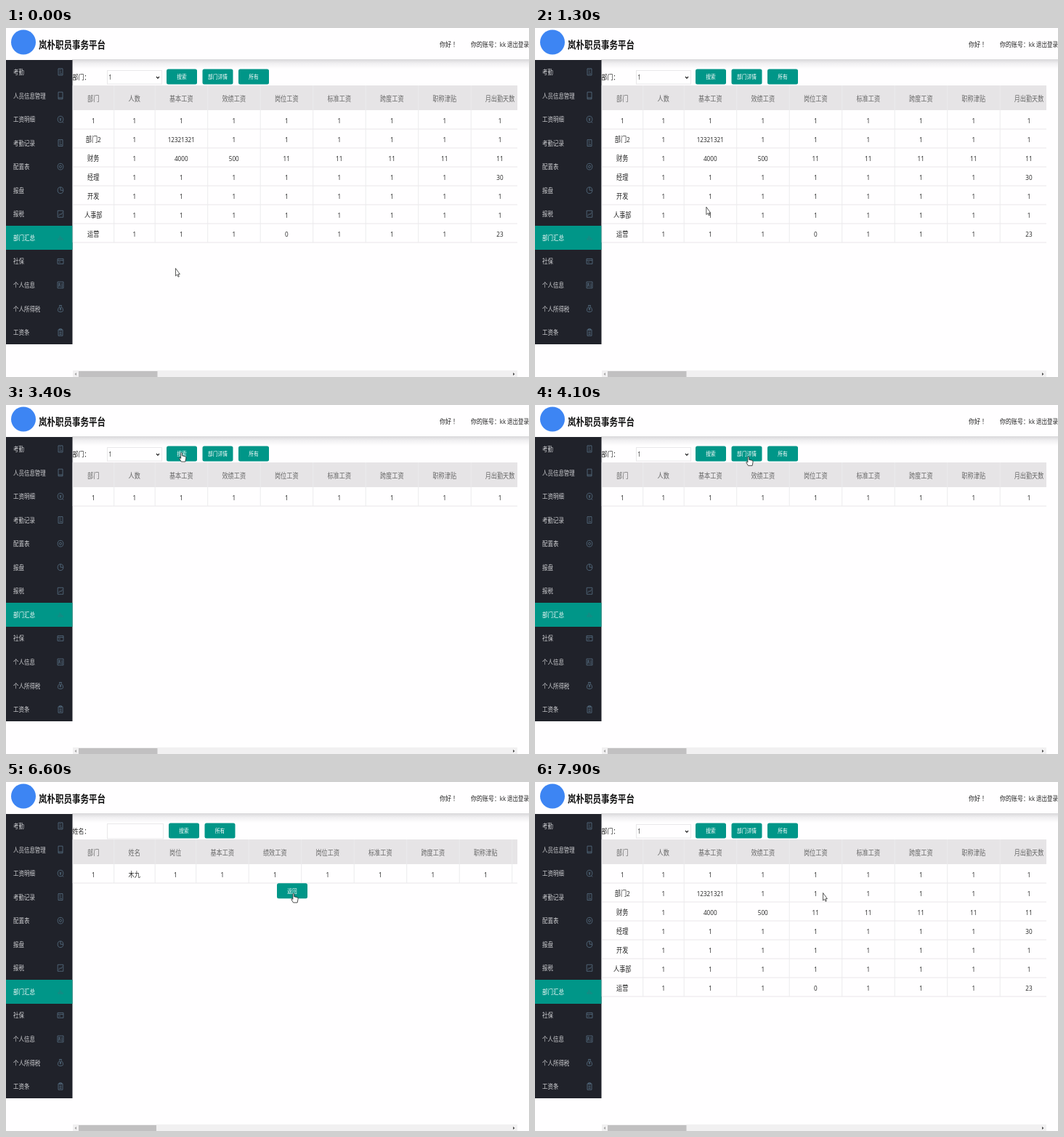
These frames come from a looping animation (720 px wide and 480 px high, 8000 ms). An HTML page:

```html
<!DOCTYPE html>
<html lang="zh">
<head>
<meta charset="utf-8">
<style>
html, body { margin: 0; width: 100%; height: 100%; overflow: hidden; background: #fffeff; }
svg { display: block; width: 720px; height: 480px; }
text { font-family: "Open Sans", "Noto Sans CJK SC", "Noto Sans CJK", sans-serif; }
</style>
</head>
<body>
<svg id="stage" viewBox="0 0 720 480">
  <defs>
    <linearGradient id="shade" x2="0" y2="1">
      <stop stop-color="#d9d8da"/><stop offset=".45" stop-color="#f1f0f2"/><stop offset="1" stop-color="#fffeff"/>
    </linearGradient>
    <clipPath id="pane"><rect x="91" y="44" width="613" height="436"/></clipPath>
  </defs>
  <g id="chrome"></g>
  <g id="page" clip-path="url(#pane)"></g>
  <path id="arrow" d="M.5 .5V11L2.6 9 4 12.3 5.3 11.7 4 8.6H6.4Z" fill="#fff" stroke="#333" stroke-width=".8"/>
  <path id="hand" d="M-1.6 1.6Q-.6 .3 .2 1.6V5.2L4.4 6.2Q5.8 6.7 5.6 8.2L4.6 13.4H-1L-3.6 9.2Q-3.8 7.8-2.4 8.2L-1.6 8.9Z" fill="#fff" stroke="#222" stroke-width=".8"/>
</svg>
<script>
const TEAL = '#009688', SQUEEZE = .84; // the whole screen is narrowed
const $ = id => document.getElementById(id);

const rect = (x, y, w, h, fill, more = '') =>
  `<rect x="${x}" y="${y}" width="${w}" height="${h}" fill="${fill}" ${more}/>`;
const text = (s, x, y, size, fill, anchor = 'start', more = '') =>
  `<text transform="translate(${x} ${y + size * .37}) scale(${SQUEEZE} 1)" font-size="${size}" fill="${fill}" text-anchor="${anchor}" ${more}>${s}</text>`;

// Menu: label and icon path, drawn around its own centre
const sheet = 'M-3-4.5H3V4.5H-3ZM-1.5-2.5H.5M-1.5 0H1M-1.5 2.5H2';
const ring = 'M-3.8 0A3.8 4.3 0 1 1 3.8 0A3.8 4.3 0 1 1-3.8 0';
const yen = 'M-1.3-2L0 0 1.3-2M0 0V2.5M-1.2 .8H1.2';
const menu = [
  ['考勤', sheet],
  ['人员信息管理', 'M-3-4.8H3V4.8H-3ZM-3 3H3'],
  ['工资明细', ring + yen + 'M2.5 3.2L4 5'],
  ['考勤记录', sheet],
  ['配置表', ring + 'M-1.5 0A1.5 1.7 0 1 1 1.5 0A1.5 1.7 0 1 1-1.5 0'],
  ['报盘', ring + 'M0-4.3V0H3.8'],
  ['报税', 'M-3.8-4.5H3.8V4.5H-3.8ZM-2.3 2.5L-.5-.2 .8 1 2.6-2'],
  ['部门汇总', 'M-2.8 3.5V.5M-.8 3.5V-2.5M1.2 3.5V-.5M3 3.5V1.2'],
  ['社保', 'M-4-3.5H4V3.5H-4ZM-4-1.3H4M-2.5 1H0'],
  ['个人信息', 'M-4-4.3H4V4.3H-4ZM-2.6 2.5V.5H-.4V2.5M-2.2-2.3H-.8V-.6H-2.2ZM1-1.5H3M1 .5H3M1 2.3H3'],
  ['个人所得税', 'M-1.5-4.5H1.5L1-2.8Q3.8-.5 3.6 2.5Q3.4 4.5 0 4.5Q-3.4 4.5-3.6 2.5Q-3.8-.5-1-2.8Z' + yen],
  ['工资条', 'M-3-3.7H3V4.7H-3ZM-1.4-4.8H1.4V-2.8H-1.4ZM-1.5-.5H1.5M-1.5 1.2H1.5M-1.5 3H1.5']
];

function drawChrome() {
  let s = rect(0, 0, 720, 480, '#fffeff') + rect(91, 43, 629, 13, 'url(#shade)') +
    '<circle cx="24" cy="19.5" r="17" fill="#3d85f3"/>' +
    text('岚朴职员事务平台', 45, 22.5, 13.7, '#111', 'start', 'font-weight="bold"') +
    text('你好 ！', 597, 22.5, 9.5, '#222') +
    text('你的账号：kk', 640, 22.5, 9.5, '#222') +
    text('退出登录', 690, 22.5, 8.9, '#222') +
    rect(0, 44, 91.5, 391, '#20222a');
  menu.forEach(([label, icon], i) => {
    const y = 60.7 + i * 32.56, on = label === '部门汇总';
    if (on) s += rect(0, 272, 91.5, 33, TEAL);
    s += text(label, 10, y, 8.9, on ? '#fff' : '#d0d1d4') +
      `<path d="${icon}" transform="translate(75 ${y - .3})" fill="none" stroke="${on ? '#2d7f80' : '#587286'}" stroke-width=".8"/>`;
  });
  $('chrome').innerHTML = s;
}

const list = {
  label: '部门：', thumb: 108.5,
  buttons: [['搜索', 221, 56.5], ['部门详情', 270.5, 56.5], ['所有', 320, 56.5]],
  widths: [56.5, 56.5, 72.5, 72.5, 72.5, 72.5, 72.5, 72.5, 80],
  head: '部门 人数 基本工资 效绩工资 岗位工资 标准工资 跨度工资 职称津贴 月出勤天数',
  rows: [
    '1 1 1 1 1 1 1 1 1',
    '部门2 1 12321321 1 1 1 1 1 1',
    '财务 1 4000 500 11 11 11 11 11',
    '经理 1 1 1 1 1 1 1 30',
    '开发 1 1 1 1 1 1 1 1',
    '人事部 1 1 1 1 1 1 1 1',
    '运营 1 1 1 0 1 1 1 23'
  ]
};
const filtered = { ...list, rows: list.rows.slice(0, 1) };
const detail = {
  label: '姓名：', thumb: 107, input: true,
  buttons: [['搜索', 224, 56.5], ['所有', 273.5, 56.5], ['返回', 373, 139.3]],
  widths: [56.5, 56.5, 56.5, 72.5, 72.5, 72.5, 72.5, 72.5, 72.5, 72.5],
  head: '部门 姓名 岗位 基本工资 绩效工资 岗位工资 标准工资 跨度工资 职称津贴',
  rows: ['1 木九 1 1 1 1 1 1 1']
};

function drawPage(v) {
  const box = 'stroke="#e9e8ea" stroke-width="1"';
  let s = text(v.label, 91.5, 67.5, 9.5, '#222');
  s += v.input ? rect(139.5, 57.5, 77, 20.5, '#fffeff', box)
    : rect(139.5, 58.5, 75, 18.5, '#fffeff', box) + text('1', 141.5, 68, 8.5, '#222') +
      '<path d="M207 67L209 69.2 211 67" fill="none" stroke="#222" stroke-width="1.2"/>';

  const bottom = 113 + v.rows.length * 26;
  s += rect(92, 79, 612, 34, '#e6e4e6');
  const line = (cells, y, fill) => {
    let x = 92;
    cells.split(' ').forEach((c, i) => {
      s += text(c, x + v.widths[i] / 2, y, 9.7, fill, 'middle');
      x += v.widths[i];
    });
  };
  line(v.head, 97, '#666');
  v.rows.forEach((r, i) => {
    line(r, 127 + i * 26, '#222');
    s += rect(92, 138.5 + i * 26, 612, 1, '#e9e8ea');
  });
  let x = 92;
  for (const w of [0, ...v.widths]) s += rect((x += w) - .3, 79, 1, bottom - 79, '#ecebed');

  for (const [label, bx, by] of v.buttons)
    s += rect(bx, by, 42, 21, TEAL, 'rx="2.5"') + text(label, bx + 21, by + 11, 8, '#fff', 'middle');

  s += rect(92, 471, 612, 9, '#f1f0f1') + rect(100, 472, v.thumb, 8, '#c1c0c1') +
    '<path d="M97 474V478L94.5 476Z" fill="#a3a3a3"/><path d="M698 474V478L700.5 476Z" fill="#505050"/>';
  $('page').innerHTML = s;
}

// Pointer path: time, x, y
const path = [
  [0, 233, 330], [500, 233.6, 329.5], [1000, 233.6, 329.5], [1800, 239, 66], [2100, 239, 64.5],
  [2500, 241, 64.5], [3350, 241, 64.5], [3900, 293, 68], [4050, 293, 68], [4100, 294.5, 70],
  [5950, 294.5, 70], [6600, 396.5, 152.5], [7400, 396.5, 152.5], [7600, 396, 152], [8000, 396, 152]
];
function pointer(t) {
  const i = path.findIndex(p => p[0] > t), [t0, x0, y0] = path[i - 1], [t1, x1, y1] = path[i];
  const k = (t - t0) / (t1 - t0), e = k * k * (3 - 2 * k);
  return [x0 + (x1 - x0) * e, y0 + (y1 - y0) * e];
}

let shown;
function frame() {
  const t = performance.now() % 8000;
  const view = t < 2500 || t >= 7600 ? list : t < 4500 ? filtered : detail;
  if (view !== shown) drawPage(shown = view);
  const [x, y] = pointer(t);
  const over = view.buttons.some(([, bx, by]) => x > bx && x < bx + 42 && y > by && y < by + 21);
  for (const id of ['arrow', 'hand']) {
    $(id).setAttribute('transform', `translate(${x} ${y})`);
    $(id).style.display = (id === 'hand') === over ? '' : 'none';
  }
  requestAnimationFrame(frame);
}
drawChrome();
frame();
</script>
</body>
</html>
```
